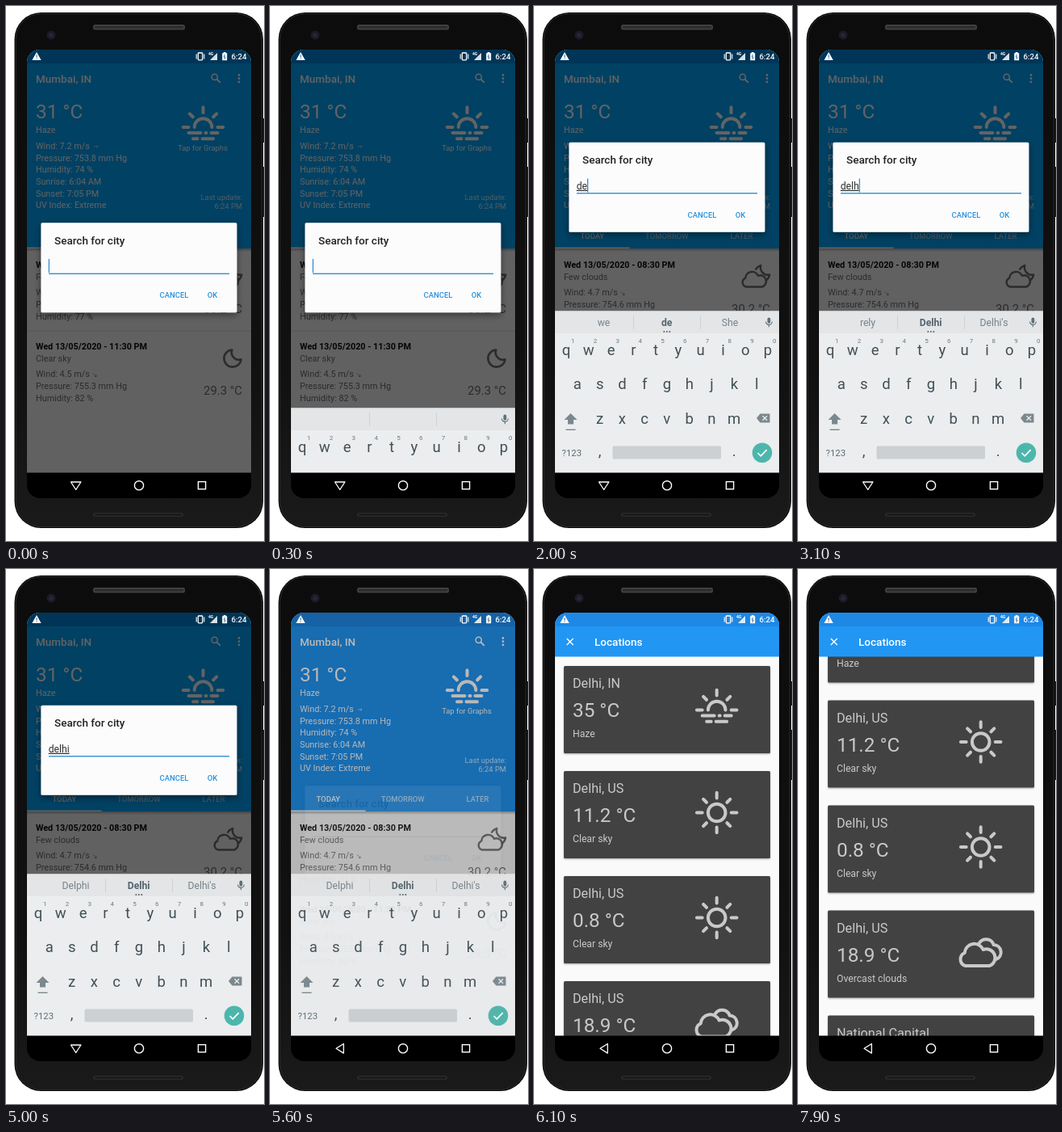
Write an HTML page that moves like this. It is 320 px wide and 662 px high and loops after 8 s.

```html
<!DOCTYPE html>
<html lang="en">
<head>
<meta charset="utf-8">
<title>Weather city search</title>
<style>
html, body { margin: 0; width: 100%; height: 100%; overflow: hidden; background: #fff; }
svg { display: block; width: 320px; height: 662px; font-family: Roboto, "Open Sans", sans-serif; }
text { white-space: pre; }
</style>
</head>
<body>
<svg id="stage" viewBox="0 0 320 662" width="320" height="662"></svg>
<script>
const text = (x, y, size, str, fill, more = '') =>
  `<text x="${x}" y="${y}" font-size="${size}" fill="${fill}" ${more}>${str}</text>`;
const rect = (x, y, w, h, fill, more = '') =>
  `<rect x="${x}" y="${y}" width="${w}" height="${h}" fill="${fill}" ${more}/>`;
const line = (d, color, width, more = '') =>
  `<path d="${d}" fill="none" stroke="${color}" stroke-width="${width}" ${more}/>`;
const group = (id, body, more = '') => `<g id="${id}" ${more}>${body}</g>`;
const MID = 'text-anchor="middle"', END = 'text-anchor="end"', MEDIUM = 'font-weight="500"';
const ROUND = 'stroke-linecap="round" stroke-linejoin="round"';

// Rays around the centre at the given angles (degrees, 0 = right)
const rays = angles => angles.map(a => {
  const c = Math.cos(a * Math.PI / 180), s = Math.sin(a * Math.PI / 180);
  const far = a % 90 ? 23.5 : 24.8;
  return `M${c * 18} ${s * 18}L${c * far} ${s * far}`;
}).join('');

const icons = {
  sun: 'M10.8 0A10.8 10.8 0 1 1 -10.8 0A10.8 10.8 0 1 1 10.8 0' + rays([0, 45, 90, 135, 180, 225, 270, 315]),
  haze: 'M-10.8 0A10.8 10.8 0 0 1 10.8 0' + rays([180, 225, 270, 315, 0]) +
    'M-18 7H-3M3 7H4M10 7H18M-12.5 14.3H-7M-1 14.3H12.5',
  cloud: 'M-19 16a8.5 8.5 0 0 1-1-16a12 12 0 0 1 23-4a10.5 10.5 0 0 1 8 20z' +
    'M-2-12a10 10 0 0 1 18 2a9.3 9.3 0 0 1 3 18',
  cloudMoon: 'M-17 19a8.5 8.5 0 0 1-1-16a12 12 0 0 1 23-4a10.5 10.5 0 0 1 8 20z' +
    'M1-13A17 17 0 0 1 10-20A13.5 13.5 0 0 0 26-3A17 17 0 0 1 19 8',
  moon: 'M-1-15.5A15.6 15.6 0 1 0 15.5 2A13.5 13.5 0 0 1-1-15.5z'
};
const icon = (name, x, y, color, width, scale = 1) =>
  line(icons[name], color, width, `transform="translate(${x} ${y}) scale(${scale})" ${ROUND}`);

function phone() {
  return rect(316, 139, 4, 30, '#1d1d1d') + rect(316, 199, 4, 62, '#1d1d1d') +
    rect(10.5, 8, 308.5, 638, '#070707', 'rx="33"') +
    rect(12.2, 9.5, 305, 635, 'url(#body)', 'rx="31.5" stroke="#2c2c2c" stroke-width="1"') +
    rect(108, 23, 114, 6.5, '#404040', 'rx="2.5"') + rect(110, 25, 110, 2.6, '#2b2b2b', 'rx="1.3"') +
    '<circle cx="56" cy="36" r="5.5" fill="#1c1c22"/><circle cx="56" cy="36" r="2.6" fill="#25254a"/>' +
    rect(108, 627, 112, 5, '#2a2a2a', 'rx="2.5"') + rect(110, 628.4, 108, 2, '#171717', 'rx="1"');
}

function forecast(y, title, sky, lines, temp, mark) {
  const grey = '#6e6e6e';
  return text(37, y, 10.8, title, '#0a0a0a', 'font-weight="700"') +
    text(37, y + 14.5, 10.8, sky, grey) +
    lines.map((s, i) => text(37, y + 34 + i * 14.8, 10.8, s, grey)).join('') +
    line(`M108 ${y + 29.5}l4 4m0-2v2h-2`, grey, .7) +
    text(293, y + 55.5, 14.9, temp, grey, END) + mark;
}

function weather() {
  const info = ['Wind: 7.2 m/s', 'Pressure: 753.8 mm Hg', 'Humidity: 74 %', 'Sunrise: 6:04 AM', 'Sunset: 7:05 PM', 'UV Index: Extreme'];
  const white = '#fff';
  return rect(26, 54, 278, 525, '#fafafa') + rect(26, 300, 278, 4, 'url(#shade)') + rect(26, 401.5, 278, 1, '#e2e2e2') +
    rect(26, 54, 278, 246, '', 'id="header"') + rect(26, 54, 278, 17, '', 'id="status"') +
    text(37, 95, 13.5, 'Mumbai, IN', white, MEDIUM) +
    '<circle cx="258.7" cy="87.8" r="3.6" fill="none" stroke="#fff" stroke-width="1.5"/>' +
    line('M261.4 90.5l4.4 4.4', white, 1.8) +
    [85.5, 89.7, 93.9].map(y => `<circle cx="289" cy="${y}" r="1.4" fill="#fff"/>`).join('') +
    text(37, 138.5, 24.3, '31 °C', white) + text(37, 157, 10.8, 'Haze', white) +
    info.map((s, i) => text(37, 177 + i * 14.65, 10.8, s, white)).join('') +
    line('M109 174h5m-1.5-1.5l1.5 1.5l-1.5 1.5', white, .7, 'opacity=".8"') +
    icon('haze', 244.5, 150, white, 4) +
    text(244, 179, 9.4, 'Tap for Graphs', white, MID) +
    text(293, 240, 9.4, 'Last update:', white, END + ' opacity=".8"') +
    text(293, 250.5, 9.4, '6:24 PM', white, END + ' opacity=".8"') +
    ['TODAY', 'TOMORROW', 'LATER'].map((s, i) =>
      text(72.3 + i * 92.6, 288.3, 9.46, s, white, `${MID} ${MEDIUM} opacity="${i ? .7 : 1}"`)).join('') +
    rect(26, 298.6, 92.6, 1.4, white) +
    forecast(324, 'Wed 13/05/2020 - 08:30 PM', 'Few clouds',
      ['Wind: 4.7 m/s', 'Pressure: 754.6 mm Hg', 'Humidity: 77 %'], '30.2 °C', icon('cloudMoon', 274.5, 334.5, '#6e6e6e', 3.6, .68)) +
    forecast(425, 'Wed 13/05/2020 - 11:30 PM', 'Clear sky',
      ['Wind: 4.5 m/s', 'Pressure: 755.3 mm Hg', 'Humidity: 82 %'], '29.3 °C', icon('moon', 281, 436, '#6e6e6e', 3.8, .68));
}

function locations() {
  const cities = [['Delhi, IN', '35 °C', 'Haze', 'haze'], ['Delhi, US', '11.2 °C', 'Clear sky', 'sun'],
    ['Delhi, US', '0.8 °C', 'Clear sky', 'sun'], ['Delhi, US', '18.9 °C', 'Overcast clouds', 'cloud'], ['National Capital', '', '', '']];
  const pale = '#c9c9c9';
  const cards = cities.map(([city, temp, sky, mark], i) => {
    const y = 120 + i * 130;
    return rect(37, y, 256, 108, '#424242', 'rx="1.5" filter="url(#soft)"') +
      text(48, y + 27.3, 16.2, city, pale) + text(48, y + 63.3, 24.3, temp, pale) + text(48, y + 88, 12.2, sky, pale) +
      (mark && icon(mark, 226.7, y + (mark === 'haze' ? 54.5 : mark === 'cloud' ? 52.5 : 51.5), pale, 4));
  }).join('');
  return rect(26, 71, 278, 508, '#fafafa') + group('list', cards) +
    rect(26, 54, 278, 54.5, '#2196f3') + rect(26, 54, 278, 17, '#1e88e5') +
    line('M40.7 86l8 8m0-8l-8 8', '#fff', 1.4) + text(75, 95, 13.5, 'Locations', '#fff', MEDIUM);
}

function dialog() {
  return rect(43.4, 268.2, 243, 111, '#fcfcfc', 'rx="1.5" filter="url(#deep)"') +
    text(60, 294.8, 13.5, 'Search for city', '#212121', MEDIUM) +
    rect(53, 330.6, 224, 1.3, '#2089d0') +
    text(52.7, 326.3, 12.2, '', '#303030', 'id="typed" text-decoration="underline"') +
    rect(53, 313, 1.2, 17, '#2089d0', 'id="caret"') +
    text(208.5, 361, 9.46, 'CANCEL', '#2590e0', `${MID} ${MEDIUM}`) + text(256, 361, 9.46, 'OK', '#2590e0', `${MID} ${MEDIUM}`);
}

function keyboard() {
  const ink = '#414f56', step = 27.78;
  const rows = [['qwertyuiop', 40, 432], ['asdfghjkl', 53.9, 474.3], ['zxcvbnm', 81.5, 516.8]];
  const keys = rows.map(([chars, x, y]) =>
    [...chars].map((c, i) => text(x + i * step, y, 18.5, c, ink, MID)).join('')).join('');
  const hints = [...'1234567890'].map((c, i) => text(48.3 + i * step, 417, 8, c, '#6d7a80', MID)).join('');
  return rect(26, 377.5, 278, 201, '#ebedef') + rect(26, 377.5, 278, 27.5, '#e3e5e7') +
    rect(123, 383, 1, 17, '#cdd2d5') + rect(206, 383, 1, 17, '#cdd2d5') +
    [86.5, 164.7, 243].map((x, i) => text(x, 396.3, 12.2, '', i === 1 ? '#55656d' : '#76838a',
      `${MID} class="hint" ${i === 1 ? 'font-weight="700"' : ''}`)).join('') +
    group('dots', [161.3, 164.8, 168.3].map(x => `<circle cx="${x}" cy="403" r="1" fill="#55656d"/>`).join('')) +
    rect(289.5, 385.5, 3.8, 7.2, '#607078', 'rx="1.9"') + line('M287.5 390.5a3.9 3.9 0 0 0 7.8 0M291.4 394.4v2.8', '#607078', 1.1) +
    keys + hints +
    '<path d="M45.5 504l8 8h-4.5v5.5h-7V512h-4.5z" fill="#7b888e"/>' + rect(39.5, 523.6, 12, 1.4, '#7b888e') +
    '<path d="M276 510l4.5-5.5h12v11h-12z" fill="#7b888e"/>' + line('M283.5 507.2l5.6 5.6m0-5.6l-5.6 5.6', '#ebedef', 1.3) +
    text(46.8, 556.5, 11.3, '?123', '#5f6d74', MID) + text(81.5, 557.3, 18.5, ',', ink, MID) +
    rect(97.5, 544.5, 134.5, 16, '#cdd0d2', 'rx="1.5"') + text(248.2, 557.3, 18.5, '.', ink, MID) +
    '<circle cx="283" cy="552.7" r="12.3" fill="#4db6ac"/>' + line('M277.5 553l3.8 3.8l7.4-7.6', '#fff', 1.7);
}

function system() {
  return '<path d="M38 57l5.6 10h-11.2z" fill="#fff"/>' + rect(37.5, 60.5, 1.1, 3, '#1e5f98') + rect(37.5, 64.5, 1.1, 1.1, '#1e5f98') +
    rect(238.3, 58, 5.4, 8.8, 'none', 'stroke="#fff" stroke-width="1.3" rx=".8"') +
    line('M236.2 59.5v6M245.8 59.5v6', '#fff', 1.1) +
    text(251, 61.3, 5, '4G', '#fff', 'font-weight="700"') + '<path d="M262 58v9h-9z" fill="#fff" opacity=".85"/>' +
    '<path d="M268.2 58.3h1.6v-1.2h2.8v1.2h1.6v9h-6z" fill="#fff"/>' + line('M271.6 60l-1.4 3h2l-1.4 3', '#245f94', .9) +
    text(279.5, 65.8, 9.6, '6:24', '#fff', MEDIUM) +
    rect(26, 577.5, 278, 31.5, '#000') +
    line('M80.5 589h12.4l-6.2 9.5z', '#fff', 1.3, 'id="down" stroke-linejoin="round"') +
    line('M91.3 587.5v11.6l-9.3-5.8z', '#fff', 1.3, 'id="back" stroke-linejoin="round"') +
    '<circle cx="165" cy="593.3" r="5.6" fill="none" stroke="#fff" stroke-width="1.4"/>' +
    rect(238.4, 588.6, 9.2, 9.2, 'none', 'stroke="#fff" stroke-width="1.4"');
}

const stage = document.getElementById('stage');
stage.innerHTML = `<defs>
  <clipPath id="screen"><rect x="26" y="54" width="278" height="555" rx="16"/></clipPath>
  <clipPath id="app"><rect x="26" y="54" width="278" height="524"/></clipPath>
  <linearGradient id="shade" x2="0" y2="1"><stop stop-opacity=".3"/><stop offset="1" stop-opacity="0"/></linearGradient>
  <linearGradient id="body" x2="0" y2="1"><stop stop-color="#0c0c0c"/><stop offset=".7" stop-color="#111"/><stop offset="1" stop-color="#1a1a1a"/></linearGradient>
  <filter id="soft"><feDropShadow dx="0" dy="1" stdDeviation="1" flood-opacity=".35"/></filter>
  <filter id="deep" x="-10%" y="-15%" width="120%" height="140%"><feDropShadow dx="0" dy="3" stdDeviation="4" flood-opacity=".45"/></filter>
</defs>` + phone() + group('view',
  group('pages', weather() + group('places', locations()) + rect(26, 54, 278, 525, '#000', 'id="dim"') +
    group('box', dialog()) + group('keys', keyboard()), 'clip-path="url(#app)"') + system(), 'clip-path="url(#screen)"');

const $ = id => document.getElementById(id);
const hintNodes = [...document.querySelectorAll('.hint')];
const LOOP = 8000;

// Each step changes only the listed values; the rest carry on
const steps = [
  [0, { header: '#03a9ff', status: '#0088e0', dim: .61, box: 1, boxY: 0, keys: 1, keysY: 202,
    typed: '', hints: [], caret: 1, back: 0, places: 0, placesY: 0, scroll: 0 }],
  [300, { keysY: 120 }],
  [400, { keysY: 30, boxY: -62 }],
  [500, { keysY: 0, boxY: -99.5 }],
  [1000, { caret: 0 }],
  [1500, { caret: 1 }],
  [1700, { typed: 'd' }],
  [1800, { hints: ['do', 'd', 'did'] }],
  [1900, { typed: 'de' }],
  [2000, { hints: ['we', 'de', 'She'] }],
  [2500, { typed: 'del' }],
  [2600, { hints: ['del', 'Delhi', 'delivery'] }],
  [3000, { typed: 'delh' }],
  [3100, { hints: ['rely', 'Delhi', "Delhi's"] }],
  [3400, { typed: 'delhi' }],
  [3500, { hints: ['Delphi', 'Delhi', "Delhi's"] }],
  [4000, { caret: 0 }],
  [4500, { caret: 1 }],
  [5000, { caret: 0 }],
  [5500, { header: '#2196f3', status: '#1e88e5', dim: .48, box: .55, back: 1 }],
  [5600, { dim: .28, box: .07, boxY: 0, typed: '', keys: .95 }],
  [5700, { dim: .06, box: 0, keysY: 70, keys: .6 }],
  [5800, { dim: 0, keys: 0 }],
  [6000, { places: .6, placesY: 14 }],
  [6100, { places: 1, placesY: 0 }],
  [7900, { scroll: -87.5 }]
];

const place = (id, opacity, y) => {
  $(id).setAttribute('opacity', opacity);
  $(id).setAttribute('transform', `translate(0 ${y})`);
};

function draw(t) {
  const s = Object.assign({}, ...steps.filter(([at]) => at <= t).map(([, change]) => change));
  $('header').setAttribute('fill', s.header);
  $('status').setAttribute('fill', s.status);
  $('dim').setAttribute('opacity', s.dim);
  place('box', s.box, s.boxY);
  place('keys', s.keys, s.keysY);
  place('places', s.places, s.placesY);
  place('list', 1, s.scroll);
  $('typed').textContent = s.typed;
  $('caret').setAttribute('x', 52.7 + (s.typed ? $('typed').getComputedTextLength() : 0));
  $('caret').setAttribute('opacity', s.caret);
  hintNodes.forEach((node, i) => node.textContent = s.hints[i] || '');
  $('dots').setAttribute('opacity', s.hints.length ? 1 : 0);
  $('down').setAttribute('opacity', 1 - s.back);
  $('back').setAttribute('opacity', s.back);
}

const start = performance.now();
function tick(now) {
  draw(Math.max(0, now - start) % LOOP);
  requestAnimationFrame(tick);
}
draw(0);
requestAnimationFrame(tick);
</script>
</body>
</html>
```
